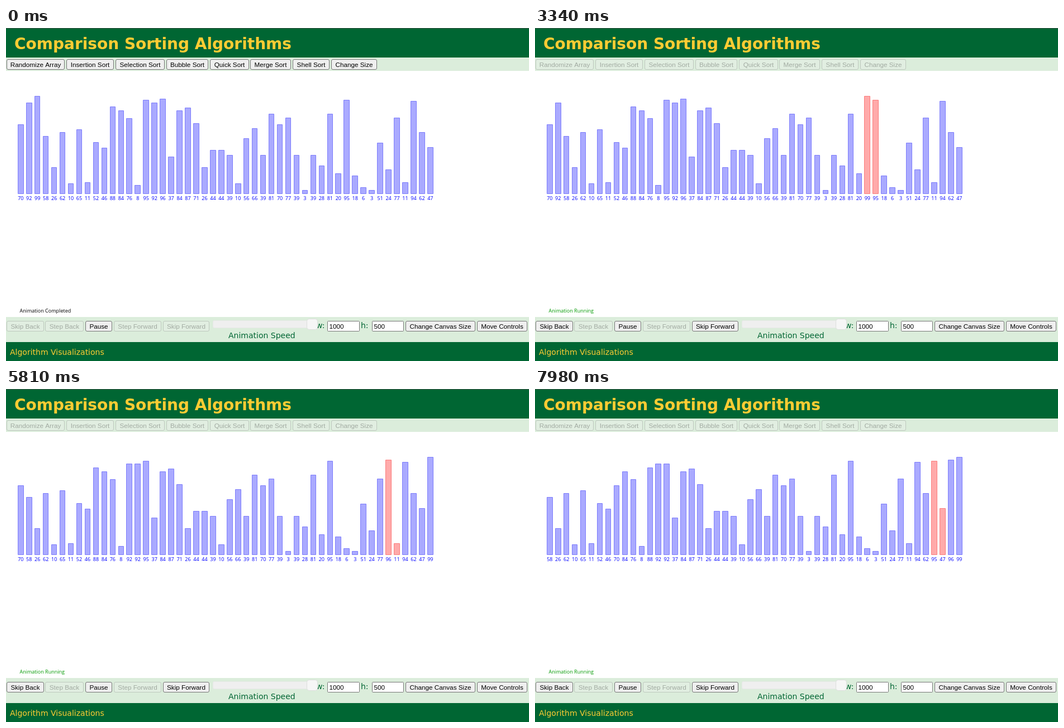
An HTML page with a canvas that plays this animation: 936 px wide and 598 px high, repeating every 8000 ms.

```html
<!DOCTYPE html>
<html lang="en">
<head>
<meta charset="utf-8">
<title>Comparison Sorting Algorithms</title>
<style>
  html, body { margin: 0; width: 100%; height: 100%; overflow: hidden; background: #fff; }
  canvas { display: block; }
</style>
</head>
<body>
<canvas id="stage" width="936" height="598"></canvas>
<script>
const ctx = document.getElementById('stage').getContext('2d');

const LOOP = 8000, SORT_START = 1600, SORT_TICK = 49.45;
const SCALE = 0.88;
const GREEN = '#006633', GOLD = '#ffcc33', PALE = '#dbeddb';
const BUTTON_FONT = '11.73px "Liberation Sans", Arial, sans-serif';
const PAGE_FONT = '14px "DejaVu Sans", Verdana, sans-serif';
const SMALL_FONT = '9px "Open Sans", "Noto Sans", sans-serif';

const VALUES = [
  70, 92, 99, 58, 26, 62, 10, 65, 11, 52, 46, 88, 84, 76, 8, 95, 92, 96, 37, 84, 87, 71, 26, 44, 44,
  39, 10, 56, 66, 39, 81, 70, 77, 39, 3, 39, 28, 81, 20, 95, 18, 6, 3, 51, 24, 77, 11, 94, 62, 47
];

// label, left, right
const SORT_BUTTONS = [
  ['Randomize Array', 1, 104], ['Insertion Sort', 108, 192], ['Selection Sort', 196, 283],
  ['Bubble Sort', 287, 361], ['Quick Sort', 365, 434], ['Merge Sort', 437, 509],
  ['Shell Sort', 513, 578], ['Change Size', 582, 663]
];
const PLAY_BUTTONS = [
  ['Skip Back', 1, 67], ['Step Back', 70, 138], ['Pause', 142, 189], ['Step Forward', 193, 277],
  ['Skip Forward', 281, 363], ['Change Canvas Size', 715, 839], ['Move Controls', 843, 932]
];
const ALWAYS_ON = ['Pause', 'Change Canvas Size', 'Move Controls'];

// Pace of the sort: [tick, comparisons done]
const PACE = [[0, -1], [18, 19], [53, 58], [67, 74], [85, 93], [109, 121], [129, 143]];

// Pointer path: [time, x, y]
const POINTER = [[60, 889, 545], [860, 333, 78], [1410, 329, 67], [1700, 329, 67], [2300, 889, 500]];

const mix = (a, b, k) => a + (b - a) * k;
const ease = k => k * k * (3 - 2 * k);

// Finds the segment of keys around t and the progress within it.
function segment(keys, t) {
  let i = 0;
  while (i < keys.length - 2 && t >= keys[i + 1][0]) i++;
  const [from, to] = [keys[i], keys[i + 1]];
  return [from, to, (t - from[0]) / (to[0] - from[0])];
}

function rect(x, y, w, h, color) {
  ctx.fillStyle = color;
  ctx.fillRect(x, y, w, h);
}

function text(str, x, y, font, color, align = 'left') {
  ctx.font = font;
  ctx.fillStyle = color;
  ctx.textAlign = align;
  ctx.fillText(str, x, y);
}

function box(left, top, right, bottom, radius, fill, stroke) {
  ctx.beginPath();
  ctx.roundRect(left + 0.5, top + 0.5, right - left - 1, bottom - top - 1, radius);
  ctx.fillStyle = fill;
  ctx.fill();
  ctx.strokeStyle = stroke;
  ctx.lineWidth = 1;
  ctx.stroke();
}

function button([label, left, right], top, enabled, hovered) {
  ctx.globalAlpha = enabled ? 1 : 0.3;
  box(left, top, right + 1, top + 19, 2.5, hovered ? '#e5e5e5' : '#efefef', hovered ? '#4f4f4f' : '#767676');
  text(label, (left + right + 1) / 2, top + 14, BUTTON_FONT, enabled ? '#000' : '#101010', 'center');
  ctx.globalAlpha = 1;
}

function field(label, value, left, right) {
  text(label, left - 20, 539, PAGE_FONT, GREEN);
  box(left, 526, right + 1, 545, 1, '#fff', '#767676');
  text(value, left + 3.5, 540, BUTTON_FONT, '#000');
}

function drawPage(running, hovered) {
  rect(0, 0, 936, 598, '#fff');
  rect(0, 0, 936, 53, GREEN);
  rect(0, 0, 936, 1, '#3f5348');
  rect(0, 53, 936, 24, PALE);
  rect(0, 519, 936, 45, PALE);
  rect(0, 564, 936, 34, GREEN);
  text('Comparison Sorting Algorithms', 15, 37.5, 'bold 28px "DejaVu Sans", Verdana, sans-serif', GOLD);
  text('Algorithm Visualizations', 7, 587, PAGE_FONT, GOLD);
  text('Animation Speed', 398, 556.5, PAGE_FONT, GREEN);
  text(running ? 'Animation Running' : 'Animation Completed', 24.5, 511, SMALL_FONT, running ? '#009900' : '#000');

  for (const b of SORT_BUTTONS) button(b, 56, !running, hovered && b[0] === 'Bubble Sort');
  for (const b of PLAY_BUTTONS) {
    button(b, 526, ALWAYS_ON.includes(b[0]) || running && b[0].startsWith('Skip'));
  }
  field('w:', '1000', 575, 632);
  field('h:', '500', 655, 711);
  box(370, 525, 557, 539, 2, '#efefef', '#e6e8e6');
  box(538, 522, 558, 542, 4, '#f6f6f6', '#dcdedc');
}

// Bubble sort after a number of comparisons; active is the left of the pair being compared.
function sortState(comparisons) {
  const values = [...VALUES];
  if (comparisons < 0) return { values, active: -2 };
  let j = 0, end = values.length - 1;
  for (let c = 0; c < comparisons; c++) {
    if (values[j] > values[j + 1]) [values[j], values[j + 1]] = [values[j + 1], values[j]];
    if (++j === end) { j = 0; end--; }
  }
  return { values, active: j };
}

function drawBars({ values, active }) {
  values.forEach((value, i) => {
    const x = 21 + 17 * SCALE * i;
    const top = 297 - Math.round(2 * SCALE * value + 0.75);
    const red = i === active || i === active + 1;
    box(Math.round(x), top, Math.round(x + 12 * SCALE), 298, 0, red ? '#ffaaaa' : '#aaaaff', red ? '#fb7c7c' : '#7c7cfb');
    text(value, x + 5.3, 308.5, SMALL_FONT, '#0000ff', 'center');
  });
}

function drawPointer(x, y) {
  ctx.save();
  ctx.translate(x + 0.5, y + 0.5);
  ctx.scale(SCALE, SCALE);
  ctx.beginPath();
  ctx.moveTo(0, 0);
  for (const [px, py] of [[0, 16], [3.7, 12.6], [6.2, 18.4], [8.8, 17.3], [6.4, 11.6], [11.4, 11.6]]) ctx.lineTo(px, py);
  ctx.closePath();
  ctx.fillStyle = '#fff';
  ctx.fill();
  ctx.strokeStyle = '#000';
  ctx.stroke();
  ctx.restore();
}

function pointerAt(t) {
  const time = 60 + 50 * Math.floor((t - 60) / 50);
  if (time < POINTER[0][0] || time > POINTER.at(-1)[0]) return null;
  const [from, to, k] = segment(POINTER, time);
  return [1, 2].map(axis => mix(from[axis], to[axis], ease(k)));
}

function draw(t) {
  const running = t >= SORT_START;
  const pointer = pointerAt(t);
  let comparisons = -1;
  if (running) {
    const [from, to, k] = segment(PACE, Math.floor((t - SORT_START) / SORT_TICK));
    comparisons = Math.round(mix(from[1], to[1], k));
  }
  drawPage(running, !running && pointer && pointer[1] < 76);
  drawBars(sortState(comparisons));
  if (pointer) drawPointer(...pointer);
}

function frame() {
  draw(performance.now() % LOOP);
  requestAnimationFrame(frame);
}
frame();
</script>
</body>
</html>
```
